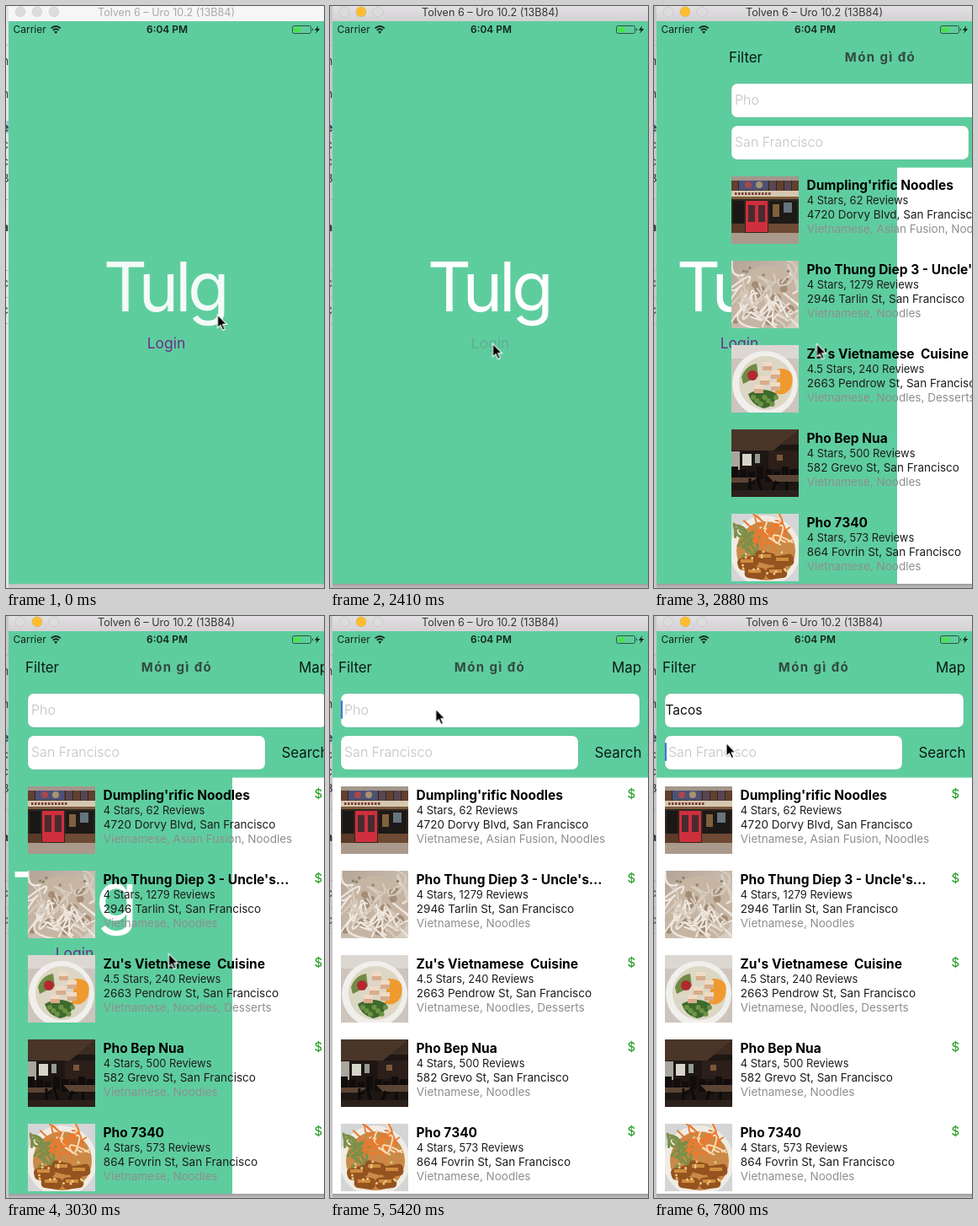
An HTML page that plays this animation: 378 by 690 pixels, repeating every 8000 ms.

```html
<!DOCTYPE html>
<html lang="en">
<head>
<meta charset="utf-8">
<title>Restaurant search</title>
<style>
  html, body { margin: 0; width: 100%; height: 100%; overflow: hidden; background: #e4e3e4; }
  svg { display: block; width: 378px; height: 690px; }
  text { font-family: Inter, Roboto, sans-serif; white-space: pre; }
  .name { font-size: 15.5px; font-weight: 700; }
  .stars { font-size: 12.9px; fill: #1c1c1c; }
  .street { font-size: 13.5px; fill: #1c1c1c; }
  .kind { font-size: 13.5px; fill: #8e8e8e; }
  .price { font-size: 15px; fill: #159a15; }
  .button { font-size: 16.9px; fill: #0b1a13; }
  .field { fill: #fff; stroke: #000; stroke-opacity: .12; stroke-width: .7; }
  .hint { font-size: 16px; font-weight: 300; fill: #c2c2c6; }
  .typed { font-size: 15.5px; fill: #111; opacity: 0; }
  .behind text { font-size: 13px; fill: #333; }
</style>
</head>
<body>
<svg viewBox="0 0 378 690">
  <defs>
    <clipPath id="screen"><rect x="3" y="18" width="375" height="667"/></clipPath>
    <clipPath id="square"><rect width="80" height="80"/></clipPath>
    <linearGradient id="barOn" x2="0" y2="1">
      <stop stop-color="#e2e0e2"/><stop offset="1" stop-color="#d3d1d3"/>
    </linearGradient>
    <linearGradient id="shade" x2="0" y2="1">
      <stop stop-color="#9c9a9c"/><stop offset="1" stop-color="#c0bec0"/>
    </linearGradient>
    <linearGradient id="plaster" x2="1" y2="1">
      <stop stop-color="#b3a496"/><stop offset="1" stop-color="#d9cfc4"/>
    </linearGradient>
  </defs>

  <rect id="desk" width="378" height="690" fill="#e4e3e4"/>
  <g class="behind" id="behind"></g>
  <rect id="foot" x="3" y="685" width="375" height="5" fill="url(#shade)"/>

  <rect id="bar" x="3" width="375" height="18" fill="#f6f6f6"/>
  <g fill="#dcdcdc" stroke="#000" stroke-opacity=".1" stroke-width=".7">
    <circle cx="17" cy="6.8" r="6"/>
    <circle id="amber" cx="37" cy="6.8" r="6"/>
    <circle cx="57" cy="6.8" r="6"/>
  </g>
  <text id="title" x="190.5" y="12" font-size="12.6" text-anchor="middle" fill="#a9a9a9">Tolven 6 – Uro 10.2 (13B84)</text>

  <g clip-path="url(#screen)">
    <rect x="3" y="18" width="375" height="667" fill="#fff"/>
    <g id="welcome">
      <rect x="3" y="18" width="375" height="667" fill="#5ecd9e"/>
      <text id="brand" x="188.5" y="362" font-size="81" font-weight="400" letter-spacing="-4.5" text-anchor="middle" fill="#f3faf7">Tulg</text>
      <text id="login" x="190.5" y="406" font-size="17.5" text-anchor="middle" fill="#6b2f88">Login</text>
    </g>
    <g id="search">
      <rect x="3" y="18" width="375" height="173.6" fill="#5ecd9e"/>
      <text class="button" x="10" y="67">Filter</text>
      <text x="190" y="66" font-size="15" font-weight="700" letter-spacing="1.4" text-anchor="middle" fill="#34493f">Món gì đó</text>
      <text class="button" x="370" y="67" text-anchor="end">Map</text>
      <rect class="field" x="13" y="92" width="355" height="40" rx="7"/>
      <rect class="field" x="13" y="142" width="282" height="40" rx="7"/>
      <text class="hint" id="hint" x="17" y="117">Pho</text>
      <text class="hint" x="17" y="167">San Francisco</text>
      <text class="button" x="370.5" y="167.5" text-anchor="end">Search</text>
      <g id="typing"></g>
      <rect id="caret" x="13" y="100" width="2" height="22" rx="1" fill="#4374dc"/>
      <g id="rows"></g>
    </g>
    <g fill="#12251c">
      <text x="8.5" y="32.4" font-size="12">Carrier</text>
      <text x="191.5" y="32.4" font-size="11.9" font-weight="600" text-anchor="middle">6:04 PM</text>
      <path d="M53.6 26.4Q59.2 21.6 64.8 26.4M55.8 28.8Q59.2 25.9 62.6 28.8" fill="none" stroke="#12251c" stroke-width="1.9"/>
      <path d="M57.2 30.6Q59.2 29 61.2 30.6L59.2 32.9Z"/>
      <rect x="340.5" y="23.5" width="22" height="9" rx="2" fill="none" stroke="#2b5241"/>
      <rect x="342" y="25" width="8.5" height="6" rx=".6" fill="#4be04f"/>
      <path d="M364 26.3Q366 28 364 29.7Z"/>
      <path d="M371.3 23.3L366.8 28.7H369.6L368.2 32.8L373.2 27.1H370.2Z"/>
    </g>
  </g>
  <path id="cursor" d="M0 0V15.6L3.6 12.3L6.2 18.2L8.7 17.1L6.2 11.4H11Z" fill="#000" stroke="#fff" stroke-width="1.1"/>
</svg>

<script>
const LOOP = 8000;
const $ = id => document.getElementById(id);

// Small repeatable random source for the food textures.
let seed = 7;
const rand = (lo, hi) => {
  seed = (seed * 16807) % 2147483647;
  return lo + (hi - lo) * seed / 2147483647;
};
const many = (n, draw) => Array.from({ length: n }, (_, i) => draw(i)).join('');
const box = (x, y, w, h, fill) => `<rect x="${x}" y="${y}" width="${w}" height="${h}" fill="${fill}"/>`;
const dot = (x, y, r, fill) => `<circle cx="${x}" cy="${y}" r="${r}" fill="${fill}"/>`;
const strand = (x, y, reach, color, width) =>
  `<path d="M${x} ${y}q${rand(-reach, reach)} ${rand(-reach, reach)} ${rand(-reach, reach)} ${rand(-reach, reach)}"
    fill="none" stroke="${color}" stroke-width="${width}" stroke-linecap="round"/>`;

const photos = [
  // Storefront
  () => box(0, 0, 80, 80, '#30261f') + box(0, 0, 80, 5, '#a3978c') +
    many(9, i => box(i * 9, 5, 8, 12, i % 2 ? '#574651' : '#62402f')) +
    box(9, 5, 34, 11, '#4c5178') + dot(20, 10, 4, '#a8484a') + dot(33, 10, 4, '#a8926f') +
    box(0, 17, 80, 7, '#d6c8b0') + many(11, i => box(4 + i * 4, 19, 2.5, 3, '#7c3f3a')) +
    box(0, 24, 80, 3, '#7d5c3c') +
    box(2, 29, 13, 27, '#191817') + box(45, 29, 33, 27, '#1d1917') +
    box(49, 33, 8, 15, '#80603d') + box(62, 31, 10, 12, '#66747b') +
    box(17, 29, 26, 37, '#cf2f3c') + box(20, 34, 8, 20, '#472b2f') + box(32, 34, 8, 20, '#472b2f') +
    box(0, 56, 16, 11, '#5a3a28') + box(44, 56, 36, 11, '#6f4a34') +
    box(0, 67, 80, 13, '#a99a8b'),

  // Noodles
  () => box(0, 0, 80, 80, 'url(#plaster)') + dot(42, 46, 40, '#c6b5a3') +
    many(14, () => dot(rand(5, 75), rand(20, 75), rand(3, 7), '#a58c75')) +
    many(48, () => strand(rand(8, 74), rand(14, 72), 28, rand(0, 1) > .4 ? '#eee7df' : '#d8ccbe', 2.2)) +
    many(6, () => dot(rand(10, 70), rand(8, 24), 1.7, '#8d8467')),

  // Bowl
  () => box(0, 0, 80, 80, '#cdc4bd') + box(0, 0, 80, 16, '#ddd7d2') +
    dot(40, 46, 39, '#f0efec') + dot(41, 45, 32, '#dcd6c4') +
    `<path d="M56 28Q78 27 71 50Q64 62 52 57Z" fill="#ee9a2e"/>
     <path d="M12 38Q17 24 30 22L32 37L14 46Z" fill="#6f8a45"/>
     <path d="M20 58Q38 48 54 58Q52 73 38 75Q24 71 20 58Z" fill="#3f6a2d"/>` +
    dot(25, 36, 6, '#b4272f') + many(7, i => dot(26 + i * 4.5, 62 + i % 3 * 4, 3, '#6d9443')) +
    [[37, 20], [47, 30], [34, 37], [47, 44], [27, 47]].map(([x, y]) =>
      box(x, y, 11, 10, '#d9ab8a') + box(x, y, 11, 5, '#f0dac5')).join(''),

  // Dining room
  () => box(0, 0, 80, 80, '#1d1613') + box(0, 0, 80, 18, '#3c2b20') +
    `<path d="M0 0H80L50 25H0Z" fill="#4a3628"/>` +
    box(0, 26, 10, 22, '#a9a69e') + box(13, 29, 11, 14, '#d5d5ca') + box(28, 29, 6, 11, '#959b92') +
    box(44, 25, 36, 22, '#2c1f19') + box(54, 30, 7, 7, '#7b5639') +
    many(8, i => box(i * 10, 44 + i % 3 * 3, 8, 15, '#100d0c')) +
    `<path d="M0 57H31L22 63H0ZM42 54H80V62H50Z" fill="#5b4434"/>
     <path d="M22 58V78M31 57L37 78M53 61L47 80M66 62V80" stroke="#0d0a09" stroke-width="3"/>` +
    box(0, 72, 80, 8, '#2c211b'),

  // Rolls and carrots
  () => box(0, 0, 80, 80, '#d3d5d6') + dot(40, 44, 42, '#f0ece4') + dot(41, 44, 35, '#c98a48') +
    many(14, () => strand(rand(8, 28), rand(18, 42), 16, '#7d8f48', 3)) +
    many(30, () => strand(rand(24, 62), rand(10, 36), 20, rand(0, 1) > .4 ? '#ea7a30' : '#f6dcb4', 2)) +
    [[7, 51, -15], [28, 45, 14], [49, 49, -10], [16, 63, 8], [41, 63, -6]].map(([x, y, turn]) =>
      `<rect x="${x}" y="${y}" width="25" height="14" rx="5" fill="#94531f" transform="rotate(${turn} ${x + 12} ${y + 6})"/>
       <path d="M${x + 4} ${y + 5}h15" stroke="#cf8c3e" stroke-width="4"/>`).join('') +
    many(16, () => dot(rand(10, 70), rand(45, 76), 1.5, '#ecc884'))
];

const places = [
  ["Dumpling'rific Noodles", '4 Stars, 62 Reviews', '4720 Dorvy Blvd', 'Vietnamese, Asian Fusion, Noodles'],
  ["Pho Thung Diep 3 - Uncle's...", '4 Stars, 1279 Reviews', '2946 Tarlin St', 'Vietnamese, Noodles'],
  ["Zu's Vietnamese  Cuisine", '4.5 Stars, 240 Reviews', '2663 Pendrow St', 'Vietnamese, Noodles, Desserts'],
  ['Pho Bep Nua', '4 Stars, 500 Reviews', '582 Grevo St', 'Vietnamese, Noodles'],
  ['Pho 7340', '4 Stars, 573 Reviews', '864 Fovrin St', 'Vietnamese, Noodles']
];

$('rows').innerHTML = places.map(([name, stars, street, kind], i) => `
  <g transform="translate(0 ${202 + i * 100})">
    <g transform="translate(13 0)" clip-path="url(#square)">${photos[i]()}</g>
    <text class="name" x="102.5" y="15.6">${name}</text>
    <text class="stars" x="102.8" y="32.8">${stars}</text>
    <text class="street" x="102.8" y="50">${street}, San Francisco</text>
    <text class="kind" x="102.8" y="67">${kind}</text>
    <text class="price" x="353.5" y="13.5">$</text>
  </g>`).join('');

// Slivers of the window behind, at the left edge.
$('behind').innerHTML =
  box(0, 136, 3, 15, '#a9c6d8') +
  [46, 229, 313, 345, 376].map(y => box(0, y, 3, 1, '#b3b2b3')).join('') +
  [...'h1n1ecc8'].map((c, i) => `<text x="-4.5" y="${69.5 + i * 19.9}" ${c === 'e' ? 'font-weight="700"' : ''}>${c}</text>`).join('') +
  '<text x="-4.5" y="267" font-weight="700">a</text><text x="-4.5" y="333">c</text><text x="-4.5" y="365">c</text>';

// Holds each value until the next time (ms).
const hold = (el, prop, steps) => el.animate(
  steps.map(([time, value]) => ({ offset: time / LOOP, [prop]: value, easing: 'step-end' })),
  { duration: LOOP, iterations: Infinity });
const move = (el, steps) =>
  hold(el, 'transform', steps.map(([time, x, y = 0]) => [time, `translate(${x}px, ${y}px)`]));

const ACTIVE = 2260, PRESS = 2410, PUSH = 2740, SHOWN = 3180;

hold($('desk'), 'fill', [[0, '#e4e3e4'], [ACTIVE, '#c9c5c8']]);
hold($('foot'), 'opacity', [[0, .5], [ACTIVE, 1]]);
hold($('bar'), 'fill', [[0, '#f6f6f6'], [ACTIVE, 'url(#barOn)']]);
hold($('amber'), 'fill', [[0, '#dcdcdc'], [ACTIVE, '#ffbd2e']]);
hold($('title'), 'fill', [[0, '#a9a9a9'], [ACTIVE, '#353535']]);
hold($('brand'), 'fill', [[0, '#f3faf7'], [ACTIVE, '#ffffff']]);
hold($('login'), 'fill', [[0, '#6b2f88'], [PRESS, '#5fad93'], [PUSH, '#6b2f88']]);

const push = [[0, 0], [PUSH, .2], [2880, .789], [3030, .965], [SHOWN, 1]];
move($('search'), push.map(([time, p]) => [time, Math.round(375 * (1 - p))]));
move($('welcome'), push.map(([time, p]) => [time, Math.round(-112.5 * p)]));
hold($('welcome'), 'opacity', [[0, 1], [SHOWN, 0]]);

const word = 'Tacos', keyTimes = [5720, 5870, 6020, 6170, 6470];
keyTimes.forEach((time, i) => {
  $('typing').insertAdjacentHTML('beforeend', `<text class="typed" x="13.5" y="117">${word.slice(0, i + 1)}</text>`);
  hold($('typing').lastChild, 'opacity', [[0, 0], [time, 1], [keyTimes[i + 1] || LOOP - 1, i < 4 ? 0 : 1]]);
});
hold($('hint'), 'opacity', [[0, 1], [keyTimes[0], 0]]);
hold($('caret'), 'opacity', [[0, 0], [5120, 1], [7650, 0], [7800, 1]]);
move($('caret'), [[0, 0], ...keyTimes.map((time, i) => [time, [9, 18, 27, 36, 44][i]]), [7800, 0, 50]]);

move($('cursor'), [
  [0, 251.5, 366], [1350, 250.5, 367], [1530, 240, 374], [1680, 222, 386], [1830, 206, 394],
  [1980, 196, 399], [2110, 193.5, 400.3],
  [3630, 191, 385], [3780, 180, 330], [3930, 163, 260], [4080, 147, 190], [4230, 135, 140],
  [4370, 127, 107], [4520, 124.5, 110], [4820, 125, 111], [5420, 125.7, 110.3],
  [6620, 125, 112], [6770, 120, 117], [6920, 110, 127], [7060, 99, 138], [7210, 91, 146],
  [7360, 87, 150], [7500, 86, 150.5]
]);
</script>
</body>
</html>
```
